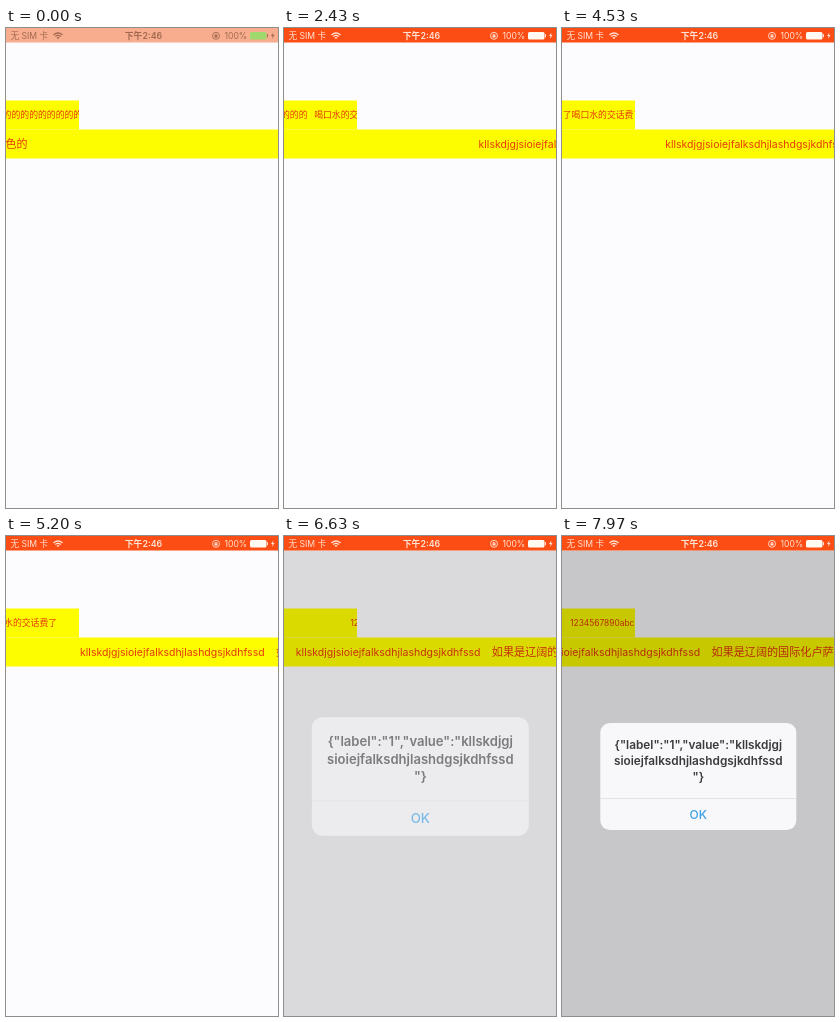
An HTML page with a canvas that plays this animation: 272 px wide and 480 px high, repeating every 8000 ms.

```html
<!DOCTYPE html>
<html lang="zh">
<head>
<meta charset="utf-8">
<title>Marquee labels</title>
<style>
  html, body { margin: 0; width: 100%; height: 100%; overflow: hidden; background: #fcfcff; }
  canvas { display: block; width: 100vw; height: 100vh; }
</style>
</head>
<body>
<canvas id="stage"></canvas>
<script>
const W = 272, H = 480, LOOP = 8000, SPEED = 0.0435;
const FONT = 'Inter, "Noto Sans CJK SC", "Noto Sans CJK", sans-serif';
const ALERT_AT = 6562;
const ORANGE = '#fc4e14', YELLOW = '#fdfd00', RED = '#e6380a';

const canvas = document.getElementById('stage');
const ctx = canvas.getContext('2d');
const ratio = window.devicePixelRatio || 1;
canvas.width = W * ratio;
canvas.height = H * ratio;

function rect(x, y, w, h, color) {
  ctx.fillStyle = color;
  ctx.fillRect(x, y, w, h);
}

function roundRect(x, y, w, h, r, color) {
  ctx.fillStyle = color;
  ctx.beginPath();
  ctx.roundRect(x, y, w, h, r);
  ctx.fill();
}

function text(str, x, y, size, color, weight = 400, align = 'left') {
  ctx.font = `${weight} ${size}px ${FONT}`;
  ctx.textAlign = align;
  ctx.textBaseline = 'alphabetic';
  ctx.fillStyle = color;
  ctx.fillText(str, x, y);
}

function clipped(x, y, w, h, draw) {
  ctx.save();
  ctx.beginPath();
  ctx.rect(x, y, w, h);
  ctx.clip();
  draw();
  ctx.restore();
}

// Position of something that passes x at time `at`
const scroll = (t, x, at) => x - SPEED * (t - at);

function wifi(x, y, color) {
  ctx.strokeStyle = ctx.fillStyle = color;
  ctx.lineWidth = 1.3;
  for (const r of [3.6, 6]) {
    ctx.beginPath();
    ctx.arc(x, y, r, -Math.PI * 0.77, -Math.PI * 0.23);
    ctx.stroke();
  }
  ctx.beginPath();
  ctx.moveTo(x, y);
  ctx.arc(x, y, 2, -Math.PI * 0.77, -Math.PI * 0.23);
  ctx.fill();
}

function rotationLock(x, y, color) {
  ctx.strokeStyle = color;
  ctx.lineWidth = 0.9;
  ctx.beginPath();
  ctx.arc(x, y, 3.5, 0, Math.PI * 2);
  ctx.stroke();
  rect(x - 1.5, y - 0.5, 3, 2.2, color);
  ctx.beginPath();
  ctx.arc(x, y - 0.5, 1, Math.PI, 0);
  ctx.stroke();
}

function bolt(x, y, color) {
  ctx.fillStyle = color;
  ctx.beginPath();
  ctx.moveTo(x + 2.4, y);
  ctx.lineTo(x, y + 3.6);
  ctx.lineTo(x + 1.6, y + 3.6);
  ctx.lineTo(x + 1, y + 6.6);
  ctx.lineTo(x + 3.6, y + 2.7);
  ctx.lineTo(x + 2, y + 2.7);
  ctx.fill();
}

function statusBar(t) {
  const pale = t < 30;
  const ink = pale ? '#a2694f' : '#ffe3d6';
  rect(0, 0, W, 14.5, pale ? '#f8ad8e' : ORANGE);
  text('无 SIM 卡', 4.5, 11, 8.6, ink);
  wifi(52, 11, ink);
  text('下午2:46', 137.5, 11, 8.8, ink, 600, 'center');
  rotationLock(210, 7.8, ink);
  text('100%', 218.5, 11, 8.6, ink);
  roundRect(244, 4, 16.5, 7.4, 1.5, pale ? '#9fd86c' : '#fffbf2');
  rect(261, 6.2, 1, 3, ink);
  bolt(265, 4.4, ink);
}

function smallRow(t) {
  rect(0, 72.5, 73, 29, YELLOW);
  clipped(0, 72.5, 73, 29, () => {
    const size = 8.85, y = 89.7;
    const end = scroll(t, 61, 1570);
    text('的'.repeat(16), end, y, size, RED, 400, 'right');
    text('喝口水的交话费了'.repeat(2), end + 6.6, y, size, RED);
    text('1234567890abc', scroll(t, 66.5, 6630), y, 8.4, RED);
  });
}

function wideRow(t) {
  rect(0, 101.5, W, 29, YELLOW);
  const y = 120, x = scroll(t, 232, 1570);
  text('色的', scroll(t, 21.5, 0), y, 11, RED, 400, 'right');
  text('kllskdjgjsioiejfalksdhjlashdgsjkdhfssd', x, y, 10.5, RED);
  text('如果是辽阔的国际化卢萨', x + 196, y, 11.1, RED);
}

// Critically damped spring, 0 to 1
function spring(ms) {
  const k = ms * 0.0228;
  return 1 - (1 + k) * Math.exp(-k);
}

function alertBox(p) {
  const ink = '#3a3a3e', scale = 1.2 - 0.2 * p;
  ctx.save();
  ctx.translate(136.3, 240.5);
  ctx.scale(scale, scale);
  ctx.globalAlpha = Math.min(1, p * 1.35);
  roundRect(-98, -53.5, 196, 107, 9.5, '#f8f8fa');
  text('{"label":"1","value":"kllskdjgj', 0, -27.5, 11.8, ink, 600, 'center');
  text('sioiejfalksdhjlashdgsjkdhfssd', 0, -11.7, 11.8, ink, 600, 'center');
  text('"}', 0, 4.2, 11.8, ink, 600, 'center');
  rect(-98, 21.5, 196, 0.8, '#dedee2');
  text('OK', 0, 42, 12, '#3a9fe6', 500, 'center');
  ctx.restore();
}

function draw(t) {
  ctx.setTransform(ratio, 0, 0, ratio, 0, 0);
  rect(0, 0, W, H, '#fcfcff');
  smallRow(t);
  wideRow(t);
  if (t > ALERT_AT) {
    const p = spring(t - ALERT_AT);
    rect(0, 14.5, W, H, `rgba(0, 0, 0, ${0.21 * Math.min(1, p * 1.4)})`);
    alertBox(p);
  }
  statusBar(t);
}

const start = performance.now();
function frame() {
  draw((performance.now() - start) % LOOP);
  requestAnimationFrame(frame);
}
frame();
</script>
</body>
</html>
```
